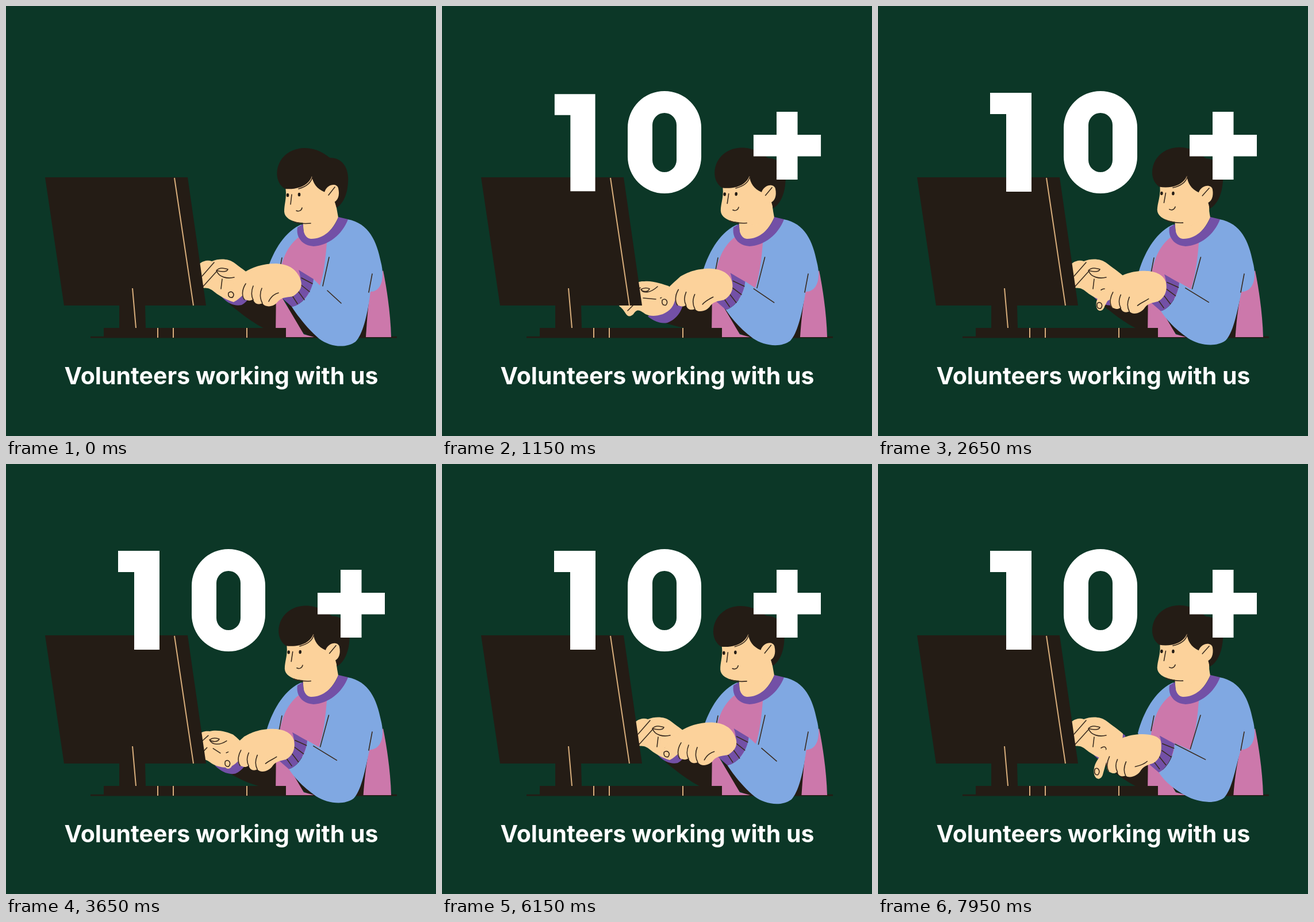
Animation, 748 px wide and 748 px high, one loop 8000 ms. Source, as an HTML page:

```html
<!DOCTYPE html>
<html lang="en">
<head>
<meta charset="utf-8">
<title>Volunteers working with us</title>
<style>
  html, body { margin: 0; width: 100%; height: 100%; overflow: hidden; background: #0c3727; }
  svg { display: block; width: 100vw; height: 100vh; }
  .ink { fill: #241c15; }
  .skin { fill: #fcd29b; }
  .blue { fill: #80a8e2; }
  .pink { fill: #cc78ab; }
  .purple { fill: #7350a6; }
  .line { fill: none; stroke: #3a2c20; stroke-width: 1.6; stroke-linecap: round; stroke-linejoin: round; }
  .shine { fill: none; stroke: #d8ae7c; stroke-width: 2; }
  .white { fill: #fff; }
  text { font: 700 41px Inter, "Open Sans", sans-serif; text-anchor: middle; }
</style>
</head>
<body>
<svg viewBox="0 0 748 748">
  <path class="ink" d="M147 574.8H680V577.6H147Z"/>

  <!-- far arm -->
  <path id="farSleeve" class="ink"/>
  <path id="farCuff" class="purple"/>
  <path id="farHand" class="skin"/>
  <path id="farLines" class="line"/>

  <!-- body -->
  <path class="ink" d="M478 490H634L626 576H530L505 560Z"/>
  <path class="blue" d="M514 380C484 392 462 430 452 468L458 482H476L486 438L512 404Z"/>
  <path class="pink" d="M508 403C488 420 480 440 474 475L520 515L545 497C553 470 557 440 559 411L535 400Z"/>
  <path class="pink" d="M470 490L480 507L518 571L536 576H469Z"/>
  <path id="side" class="pink"/>
  <path class="line" d="M480 438L475 464"/>

  <!-- monitor -->
  <path class="ink" d="M68 298H316L348 521H242L243 560H487V577H170V560H197V521H101Z"/>
  <path class="shine" d="M293 299L326 521M220 491L226 560M264 560V577M291 560V577M419 560V577"/>

  <!-- near arm -->
  <path id="sleeve" class="blue"/>
  <path class="line" d="M637 466L631 498"/>
  <path id="crease" class="line"/>
  <path id="cuff" class="purple"/>
  <path id="ribs" class="line"/>
  <path id="hand" class="skin"/>
  <path id="handLines" class="line"/>

  <!-- head -->
  <path class="skin" d="M516 372C518 390 517 400 521 408C540 412 562 402 578 368L573 340L530 350Z"/>
  <g id="head">
    <path class="skin" d="M486 312L487 325C487 340 484 345 484 358C485 370 500 377 518 377L545 382L575 362L573 335L560 305L535 290Z"/>
    <path class="ink" d="M485 318C470 308 468 288 476 272C488 248 520 240 548 254C556 258 560 262 564 264C585 264 597 282 595 306C594 330 585 345 575 351L571 338L555 324C540 318 534 308 532 296C527 312 508 320 485 318Z"/>
    <path class="skin" d="M554 324C558 310 575 307 578 317C581 330 577 338 571 341Z"/>
    <path class="line" d="M561 329L572 315M497 328L495 345M505 356C509 358 514 356 515 351M500 375C508 378 520 379 530 378M509 318C523 314 531 307 533 297"/>
    <g id="open" class="ink">
      <ellipse cx="490" cy="329" rx="2.3" ry="3.2"/>
      <ellipse cx="510" cy="328" rx="2.3" ry="3.2"/>
    </g>
    <path id="closed" class="line" d="M487 329Q490 333 493 329M506 328Q510 332 513 328"/>
  </g>
  <path class="purple" d="M507 385L517 379C516 392 520 404 530 405C550 406 570 390 578 367L595 371C585 398 560 417 535 418C515 417 504 402 507 385Z"/>

  <g class="white" role="img" aria-label="10 +">
    <path id="one" d="M195 151H267V323H223V188H195Z"/>
    <path id="zero" fill-rule="evenodd" d="M323 212A64 64 0 0 1 451 212V262A64 64 0 0 1 323 262ZM366 207A21 21 0 0 1 408 207V268A21 21 0 0 1 366 268Z"/>
    <path id="plus" d="M582 184H618.5V224H659V261.5H618.5V302H582V261.5H542V224H582Z"/>
  </g>
  <text class="white" x="374.5" y="658">Volunteers working with us</text>
</svg>
<script>
const LOOP = 8000, STEP = 50, TYPING = 5400;
const el = id => document.getElementById(id);

// Two poses per part: raised, then pressed down.
const far = {
  farSleeve: ["M388 518C405 532 430 552 450 561L472 561L472 490L432 480Z",
    "M388 551C405 557 420 561 440 561L472 561L472 500L418 515Z"],
  farCuff: ["M372 502C382 515 395 523 410 520C425 512 432 490 430 472L415 462Z",
    "M358 540C370 549 380 553 392 551C408 545 418 530 420 515L402 498Z"],
  farHand: ["M325 462C335 445 348 440 358 444C372 438 388 440 396 446C408 455 418 462 426 469C426 490 410 508 396 515C385 512 372 505 362 497C352 488 346 492 342 490C332 490 325 480 325 462Z",
    "M308 522C320 490 335 478 352 479C365 477 385 484 394 487C400 492 403 497 406 503C406 520 398 530 384 536C372 540 362 540 354 536C345 530 340 525 333 536C320 547 321 530 308 522Z"],
  farLines: ["M341 470L362 446M340 491L367 461M366 460C373 453 382 457 386 458C384 464 372 462 366 460C370 472 385 475 397 472M376 475L374 492M388 494C398 487 400 500 392 506",
    "M330 500L345 490M323 530L338 515M346 493C353 489 357 490 361 492C358 498 350 498 346 493C350 500 362 500 375 488M350 508L372 510M380 508C392 503 396 518 384 520"]
};
const near = {
  side: ["M656 460C664 500 669 540 670 576L626 576C628 545 630 520 634 490Z",
    "M656 460C664 500 669 540 670 576L618 576C620 545 625 520 631 490Z"],
  sleeve: ["M594 371C632 378 645 410 652 445C660 475 652 497 634 497C630 530 622 570 608 584C590 597 562 592 545 579C525 562 508 540 497 523C515 520 532 500 534 474L546 486C552 470 556 440 558 412Z",
    "M594 371C632 378 645 410 652 445C660 475 652 497 631 497C621 530 616 565 602 580C585 593 555 588 535 577C515 566 500 555 488 537C500 532 515 510 515 486L543 498C552 470 556 440 558 412Z"],
  crease: ["M562 437L551 487M559 495L583 517", "M561 437L543 496M515 487L569 514"],
  cuff: ["M509 459L535 475C533 497 515 521 497 523L479 507C500 507 520 490 509 459Z",
    "M489 473L515 487C513 510 500 532 488 537L468 520C490 515 496 490 489 473Z"],
  ribs: ["M514 473L533 483M513 485L528 497M508 496L519 511M498 504L507 518",
    "M494 487L514 495M493 499L509 510M488 509L500 524M479 518L489 531"],
  hand: ["M513 478C506 455 488 449 470 448C445 448 428 455 415 463C400 478 390 485 385 497C384 508 394 510 398 500L411 490C408 500 412 511 417 511C422 513 426 513 430 510C432 519 440 520 446 517C452 526 467 523 473 514C480 506 490 507 499 505C510 498 516 490 513 478Z",
    "M491 482C487 474 474 471 460 471C436 471 424 478 414 483C398 496 380 512 376 528C371 552 388 555 391 541L397 518C397 532 399 537 403 537C408 540 412 540 416 536C417 544 424 546 430 543C437 549 452 543 457 533C464 524 472 524 478 521C490 514 494 500 491 482Z"],
  handLines: ["M417 483C410 494 410 505 415 511M430 487C426 497 427 506 430 511M445 491C441 500 442 510 446 517M457 514C461 505 467 501 474 499M387 499C393 494 399 501 394 507C388 508 386 504 387 499",
    "M402 510C397 520 397 530 401 536M416 515C412 523 413 531 416 537M431 519C427 528 427 537 430 543M447 527C453 526 462 524 468 518M377 532C383 527 387 537 382 542C377 543 375 538 377 532"]
};

// Tracks of [ms, value] within one typing cycle.
const headTrack = [[600, 0], [1150, .5], [1550, .9], [1800, 1], [3000, 1], [3650, .5], [4250, 0]];
const farTrack = [[750, 0], [1150, 1], [1500, .04], [1580, .02], [1950, 1], [2300, 0], [3450, 0],
  [3650, .6], [3800, 1], [4250, 0]];
const nearTrack = [[600, 0], [1150, .38], [1550, 1], [1950, .4], [2500, 1], [2550, .96], [2650, .55],
  [2900, .3], [3250, 1], [3650, .55], [3900, .55], [4300, 0]];

function sample(track, t) {
  const i = track.findIndex(([at]) => at >= t);
  if (i === 0) return track[0][1];
  if (i < 0) return track[track.length - 1][1];
  const [t0, a] = track[i - 1], [t1, b] = track[i];
  const k = (t - t0) / (t1 - t0);
  return a + (b - a) * k * k * (3 - 2 * k);
}

function mix(from, to, k) {
  const ends = to.match(/[\d.]+/g);
  let i = 0;
  return from.replace(/[\d.]+/g, n => (+n + (ends[i++] - n) * k).toFixed(2));
}

function pose(parts, k) {
  for (const [id, [up, down]] of Object.entries(parts)) el(id).setAttribute("d", mix(up, down, k));
}

function pop(id, t, start, x, y) {
  const u = (t - start) / 1000;
  const s = u <= 0 ? 0 : 1 - Math.exp(-6.7 * u) * Math.cos(Math.PI * u / .3);
  el(id).setAttribute("transform", `translate(${x} ${y}) scale(${s}) translate(${-x} ${-y})`);
}

function draw(t) {
  const cycle = t % TYPING;
  pose(far, sample(farTrack, cycle));
  pose(near, sample(nearTrack, cycle));
  el("head").setAttribute("transform", `rotate(${3.4 * sample(headTrack, cycle)} 545 385)`);
  const blink = cycle >= 1480 && cycle < 1620;
  el("open").style.display = blink ? "none" : "";
  el("closed").style.display = blink ? "" : "none";
  pop("plus", t, 200, 600, 243);
  pop("one", t, 550, 243, 280);
  pop("zero", t, 700, 387, 280);
}

const begin = performance.now();
function tick() {
  const t = (performance.now() - begin) % LOOP;
  draw(Math.floor(t / STEP) * STEP);
  requestAnimationFrame(tick);
}
tick();
</script>
</body>
</html>
```
